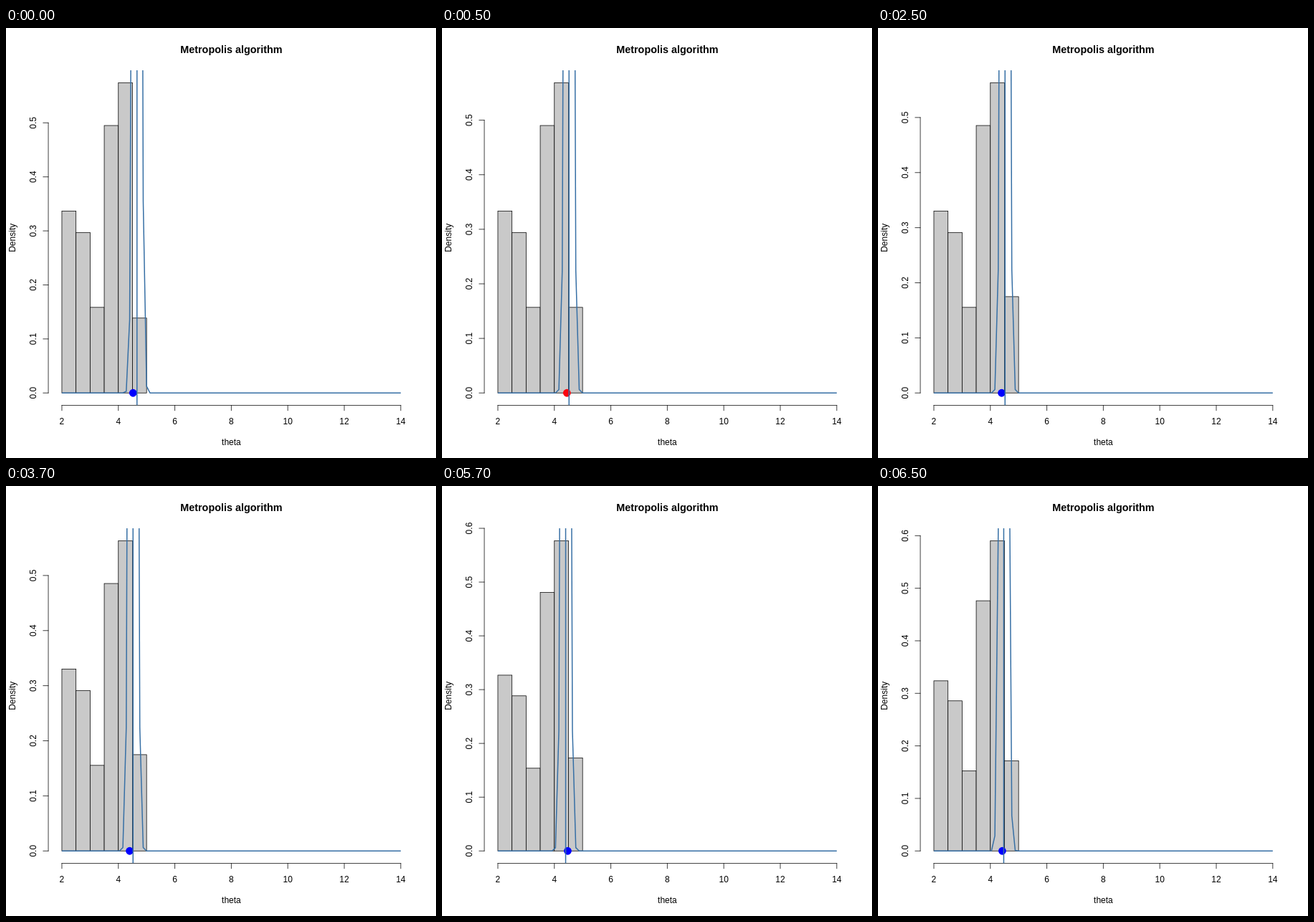
Write an HTML page that moves like this. It is 600x600 px and loops after 8000 ms.

```html
<!DOCTYPE html>
<html lang="en">
<head>
<meta charset="utf-8">
<title>Metropolis algorithm</title>
<style>
  html, body { margin: 0; width: 100%; height: 100%; overflow: hidden; background: #fff; }
  svg { display: block; width: 600px; height: 600px; }
  text { font: 12px Arial, "Liberation Sans", sans-serif; text-anchor: middle; }
  .title { font-size: 14.4px; font-weight: bold; }
  .axis { fill: none; stroke: #000; stroke-width: .75; stroke-linecap: round; }
  .bar { fill: #c9c9c9; stroke: #000; stroke-width: .75; }
  .curve { fill: none; stroke: #366fa5; stroke-width: 1.5; stroke-linejoin: round; }
</style>
</head>
<body>
<svg viewBox="0 0 600 600">
  <clipPath id="region"><rect x="59.04" y="59.04" width="510.72" height="467.52"/></clipPath>
  <text class="title" x="314.4" y="35">Metropolis algorithm</text>
  <text x="314.4" y="582">theta</text>
  <text transform="translate(13 292.8) rotate(-90)">Density</text>
  <g id="xAxis"></g>
  <g id="yAxis"></g>
  <g id="bars"></g>
  <g clip-path="url(#region)">
    <path id="density" class="curve"/>
    <circle id="proposal" r="5.4"/>
    <path id="current" class="curve"/>
  </g>
</svg>
<script>
const LOOP = 8000, TOP = 59.04, BOTTOM = 526.56, LEFT = 59.04;
const BASE = 509.24, HEIGHT = 432.89, SD = 0.1, BIN = 0.5;
const BLUE = '#0000ff', RED = '#fb0510';

// Each step: start time, current theta, proposed theta, dot colour, counts of the last two bins
const steps = [
  { at: 0,    theta: 4.66,  next: 4.52,  color: BLUE, tail: [29, 7] },
  { at: 500,  theta: 4.52,  next: 4.445, color: RED,  tail: [29, 8] },
  { at: 2500, theta: 4.52,  next: 4.4,   color: BLUE, tail: [29, 9] },
  { at: 4500, theta: 4.4,   next: 4.474, color: BLUE, tail: [30, 9] },
  { at: 6500, theta: 4.474, next: 4.422, color: BLUE, tail: [31, 9] }
];
const head = [17, 15, 8, 25];

const get = id => document.getElementById(id);
const px = x => 77.956 + (x - 2) * 39.407;
const normal = (x, mean) =>
  Math.exp(-(((x - mean) / SD) ** 2) / 2) / (SD * Math.sqrt(2 * Math.PI));

function drawXAxis() {
  let path = `M${px(2)} ${BOTTOM}H${px(14)}`, labels = '';
  for (let x = 2; x <= 14; x += 2) {
    path += `M${px(x)} ${BOTTOM}v7.2`;
    labels += `<text x="${px(x)}" y="553">${x}</text>`;
  }
  get('xAxis').innerHTML = `<path class="axis" d="${path}"/>${labels}`;
}

function drawYAxis(py, peak) {
  const last = Math.floor(peak * 1.04 * 10 + 1e-6);
  let path = `M${LEFT} ${py(0)}V${py(last / 10)}`, labels = '';
  for (let i = 0; i <= last; i++) {
    const y = py(i / 10);
    path += `M${LEFT} ${y}h-7.2`;
    labels += `<text transform="translate(42 ${y}) rotate(-90)">${(i / 10).toFixed(1)}</text>`;
  }
  get('yAxis').innerHTML = `<path class="axis" d="${path}"/>${labels}`;
}

function drawStep({ theta, next, color, tail }) {
  const counts = head.concat(tail);
  const total = counts.reduce((a, b) => a + b);
  const heights = counts.map(c => c / (total * BIN));
  const peak = Math.max(...heights);
  const py = d => BASE - HEIGHT * d / peak;

  drawYAxis(py, peak);
  get('bars').innerHTML = heights.map((h, i) =>
    `<rect class="bar" x="${px(2 + i * BIN)}" y="${py(h)}" width="${BIN * 39.407}" height="${BASE - py(h)}"/>`
  ).join('');

  const points = Array.from({ length: 101 }, (_, i) => {
    const x = 2 + i * 0.12;
    return `${px(x).toFixed(2)} ${py(normal(x, theta)).toFixed(2)}`;
  });
  get('density').setAttribute('d', 'M' + points.join('L'));
  get('current').setAttribute('d', `M${px(theta)} ${TOP}V${BOTTOM}`);

  const dot = get('proposal');
  dot.setAttribute('cx', px(next));
  dot.setAttribute('cy', BASE);
  dot.setAttribute('fill', color);
}

let shown = null;
function render(ms) {
  const t = ms % LOOP;
  const step = steps.filter(s => s.at <= t).pop();
  if (step !== shown) drawStep(shown = step);
}

drawXAxis();
render(0);
let start = null;
requestAnimationFrame(function tick(now) {
  start ??= now;
  render(Math.max(0, now - start));
  requestAnimationFrame(tick);
});
</script>
</body>
</html>
```
